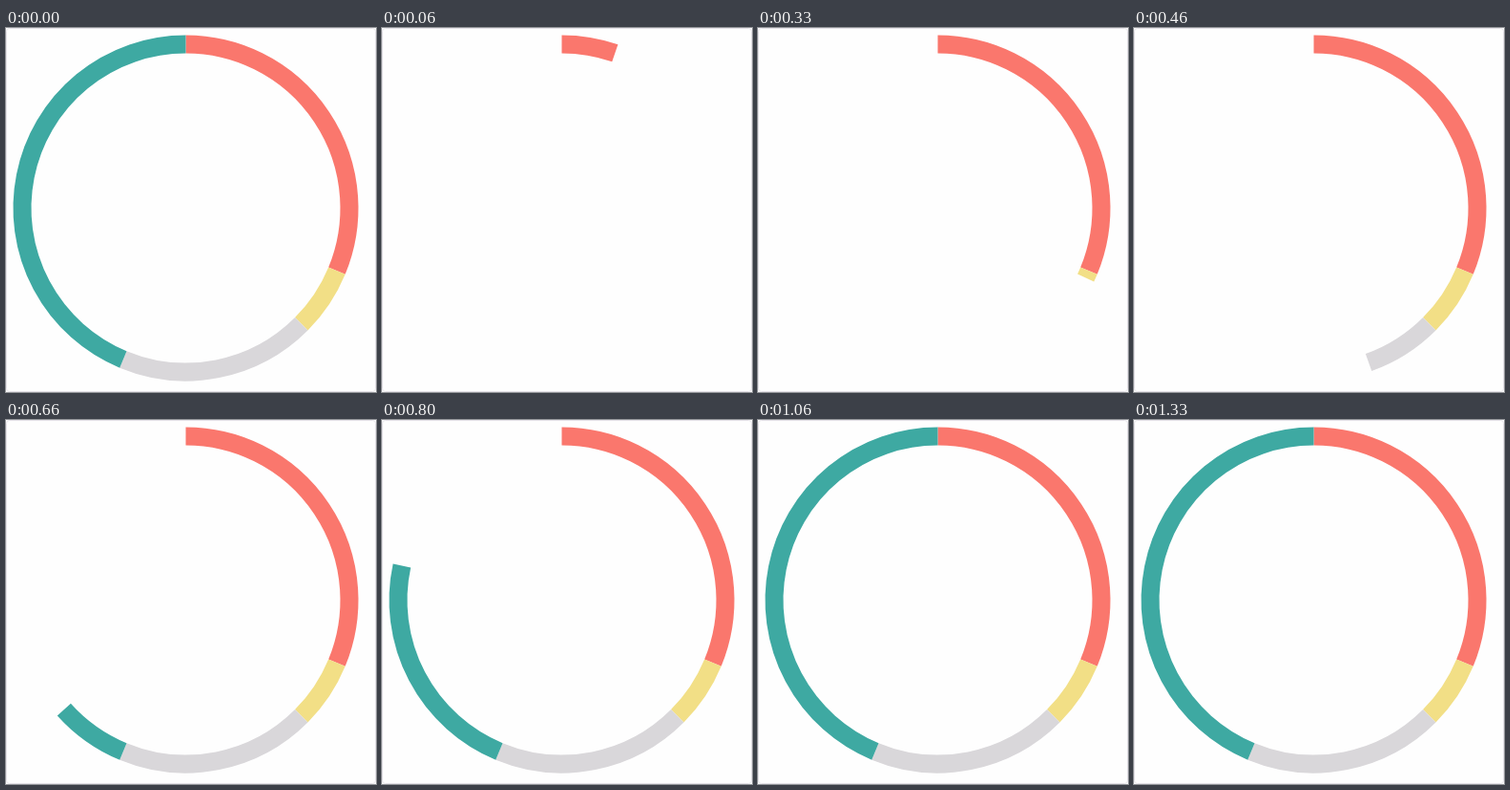
An HTML page that plays this animation: 388x381 px, repeating every 1670 ms.

```html
<!DOCTYPE html>
<html lang="en">
<head>
<meta charset="utf-8">
<title>Ring chart</title>
<style>
  html, body { margin: 0; width: 100%; height: 100%; overflow: hidden; background: #fff; }
  svg { display: block; width: 100vw; height: 100vh; }
</style>
</head>
<body>
<svg viewBox="0 0 388 381">
  <rect x="0.5" y="0.5" width="387" height="380" rx="3" fill="#fefefe" stroke="#e7e4ea"/>
  <g id="ring" fill="none" stroke-width="19"></g>
</svg>
<script>
const LOOP = 1670;
const STEP = 200 / 3;
const CX = 188.5, CY = 188.5, R = 171.5;

// Shares of the whole, in sixteenths
const parts = [
  { share: 5, color: '#fa776d' },
  { share: 1, color: '#f2df86' },
  { share: 3, color: '#d9d7da' },
  { share: 7, color: '#3ea9a2' }
];

// Sweep in degrees reached after a number of steps
const keys = [[1, 19], [3, 70], [7, 160.4], [10, 228.1], [14, 336.2], [15, 360]];

const ring = document.getElementById('ring');
let from = 0;
for (const part of parts) {
  part.from = from;
  part.to = from += part.share * 22.5;
  part.path = document.createElementNS('http://www.w3.org/2000/svg', 'path');
  part.path.setAttribute('stroke', part.color);
  ring.appendChild(part.path);
}

function point(deg) {
  const a = deg * Math.PI / 180;
  return (CX + R * Math.sin(a)).toFixed(3) + ' ' + (CY - R * Math.cos(a)).toFixed(3);
}

function arc(a, b) {
  return b > a ? `M${point(a)}A${R} ${R} 0 0 1 ${point(b)}` : '';
}

function sweepAt(step) {
  if (step < 1 || step >= 15) return 360;
  const i = keys.findIndex(k => k[0] > step);
  const [s0, a0] = keys[i - 1], [s1, a1] = keys[i];
  return a0 + (a1 - a0) * (step - s0) / (s1 - s0);
}

function draw(ms) {
  // Steps land on whole hundredths of a second
  const step = Math.floor((Math.floor(ms / 10) * 10 + 9.99) / STEP);
  const sweep = sweepAt(step);
  for (const p of parts) p.path.setAttribute('d', arc(p.from, Math.min(p.to, sweep)));
}

const start = performance.now();
function tick() {
  draw((performance.now() - start) % LOOP);
  requestAnimationFrame(tick);
}
draw(0);
requestAnimationFrame(tick);
</script>
</body>
</html>
```
